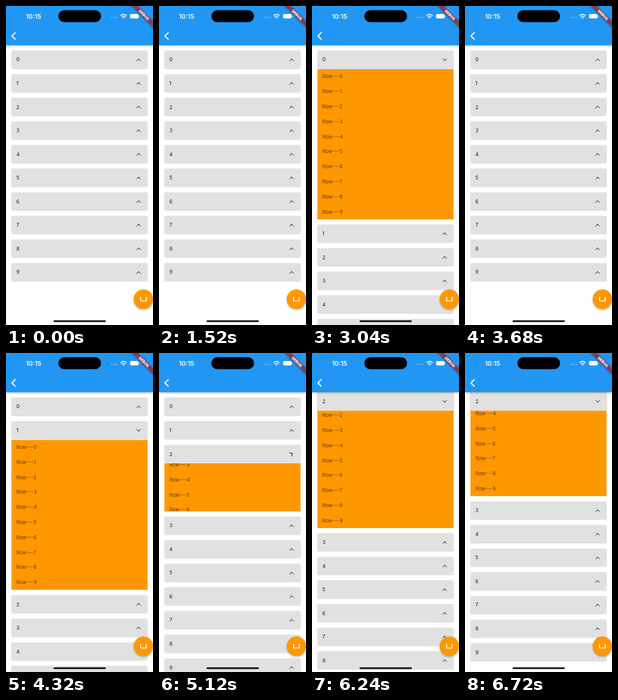
Animation, 184 px wide and 399 px high, one loop 6800 ms. Source, as an HTML page:

```html
<!DOCTYPE html>
<html lang="en">
<head>
<meta charset="utf-8">
<title>Expandable list</title>
<style>
  html, body { margin: 0; width: 100%; height: 100%; overflow: hidden; background: #fff; }
  #stage { display: block; width: 184px; height: 399px; font-family: Inter, "Noto Sans", sans-serif; }
  .line { fill: none; stroke-linecap: round; stroke-linejoin: round; }
  .shade { filter: drop-shadow(0 1px 1.2px rgba(0, 0, 0, .3)); }
</style>
</head>
<body>
<svg id="stage" viewBox="0 0 184 399">
  <rect width="184" height="399" fill="#fff"/>
  <svg y="49" width="184" height="350" viewBox="0 49 184 350"><g id="list"></g></svg>

  <g id="bar">
    <rect class="shade" width="184" height="49" fill="#2196f3"/>
    <text x="34.5" y="15.8" font-size="7.8" font-weight="600" fill="#fff" text-anchor="middle">10:15</text>
    <rect x="65.5" y="5.3" width="53.5" height="15" rx="7.5" fill="#000"/>
    <g fill="#fff" fill-opacity=".5">
      <circle cx="132" cy="14.3" r=".7"/><circle cx="134.4" cy="14.3" r=".7"/>
      <circle cx="136.8" cy="14.3" r=".7"/><circle cx="139.2" cy="14.3" r=".7"/>
    </g>
    <g class="line" stroke="#fff" stroke-width="1.2">
      <path d="M143.6 11.9Q147.2 8.7 150.8 11.9M145.2 13.6Q147.2 11.9 149.2 13.6"/>
      <path d="M147.2 15v.1" stroke-width="1.6"/>
      <path d="M11.6 33.3L7.4 37.4L11.6 41.5" stroke-width="1.4"/>
    </g>
    <rect x="155.3" y="10" width="10.7" height="5.6" rx="1.6" fill="#fff"/>
    <rect x="166.6" y="11.8" width=".8" height="2" rx=".4" fill="#fff" fill-opacity=".6"/>
  </g>

  <g class="shade"><circle cx="172" cy="366.8" r="12.2" fill="#ff9800"/></g>
  <path class="line" d="M168.5 364.3V369H175.5V364.3" stroke="#fff" stroke-width="1.2"/>
  <rect x="59.5" y="393.2" width="65.5" height="2" rx="1" fill="#000"/>

  <g transform="translate(184 0) rotate(45)">
    <rect class="shade" x="-20" y="13.1" width="40" height="5.6" fill="#b71c1c" fill-opacity=".66"/>
    <text y="17.6" font-size="4.7" font-weight="900" fill="#fff" text-anchor="middle">DEBUG</text>
  </g>
</svg>
<script>
const LOOP = 6800, STEP = 80;
const LEFT = 6.5, WIDTH = 171, TOP = 55.6, PITCH = 29.55, HEAD = 23.3;
const ROW = 18.8, FULL = ROW * 10, PIN = 49;

// Per section: [time, open fraction]
const OPEN = [
  [[2560, .02], [2640, .32], [2720, .83], [2800, 1], [3520, .83], [3600, .32], [3680, 0]],
  [[3840, .02], [3920, .32], [4000, .83], [4080, 1], [4560, .95], [4640, .5], [4720, .1], [4800, 0]],
  [[5040, .02], [5120, .32], [5200, 1]]
];
// [time, scroll offset]
const SCROLL = [[5920, 8], [6000, 29], [6080, 57], [6160, 84], [6240, 107],
  [6320, 123], [6400, 134], [6480, 141], [6560, 145], [6640, 146.4], [6720, 146.8]];

function at(table, t) {
  let value = 0;
  for (const [time, v] of table || []) if (t >= time) value = v;
  return value;
}

function add(parent, tag, attrs, text) {
  const el = document.createElementNS("http://www.w3.org/2000/svg", tag);
  for (const key in attrs) el.setAttribute(key, attrs[key]);
  if (text !== undefined) el.textContent = text;
  return parent.appendChild(el);
}

function makeSection(i) {
  const group = add(document.getElementById("list"), "g", {});
  const body = add(group, "svg", { x: LEFT, width: WIDTH, height: 0, overflow: "hidden" });
  const rows = add(body, "g", {});
  if (OPEN[i]) {
    add(rows, "rect", { width: WIDTH, height: FULL, fill: "#ff9800" });
    for (let r = 0; r < 10; r++) {
      add(rows, "text", { x: 6.5, y: ROW * (r + .5) + 2.2, "font-size": 6.3, fill: "#5f3d0c" }, "Row---" + r);
    }
  }
  const head = add(group, "g", {});
  add(head, "rect", { x: LEFT, width: WIDTH, height: HEAD, rx: 2.4, fill: "#e1e1e1" });
  add(head, "text", { x: 13, y: HEAD / 2 + 2.2, "font-size": 6.2, "font-weight": 500, fill: "#333" }, i);
  const arrow = add(head, "path", {
    class: "line", d: "M-2.2 1.1L0 -1.1L2.2 1.1", stroke: "#333", "stroke-width": 1
  });
  return { body, rows, head, arrow };
}

const sections = Array.from({ length: 10 }, (_, i) => makeSection(i));

function draw(t) {
  let y = TOP - at(SCROLL, t);
  sections.forEach((s, i) => {
    const open = at(OPEN[i], t), height = FULL * open;
    const headY = Math.max(y, Math.min(PIN, y + height));
    s.head.setAttribute("transform", `translate(0 ${headY})`);
    s.arrow.setAttribute("transform", `translate(166 ${HEAD / 2}) rotate(${180 * open})`);
    s.body.setAttribute("y", y + HEAD);
    s.body.setAttribute("height", height);
    s.rows.setAttribute("transform", `translate(0 ${(height - FULL) / 2})`);
    y += PITCH + height;
  });
}

const start = performance.now();
function tick() {
  const t = (performance.now() - start) % LOOP;
  draw(Math.floor(t / STEP) * STEP);
  requestAnimationFrame(tick);
}
tick();
</script>
</body>
</html>
```
